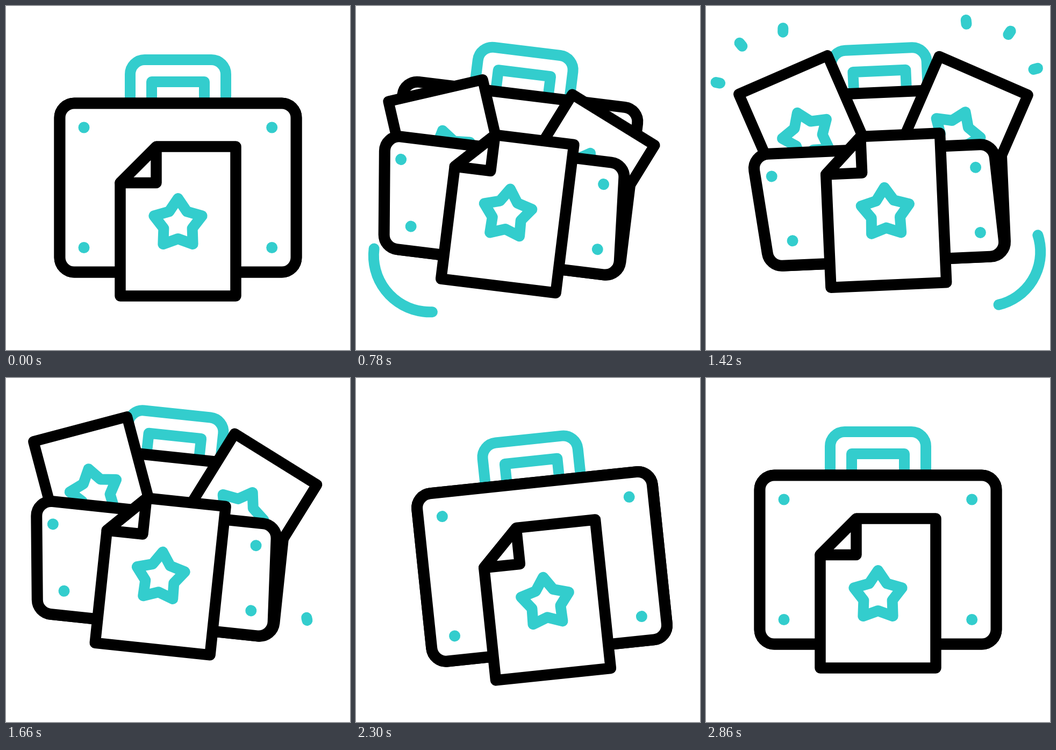
Recreate the animation shown at these times as an HTML page with a canvas. Size 640 px wide and 640 px high, loop 3560 ms.

```html
<!DOCTYPE html>
<html lang="en">
<head>
<meta charset="utf-8">
<title>Briefcase</title>
<style>
  html, body { margin: 0; width: 100%; height: 100%; overflow: hidden; background: #fff; }
  canvas { display: block; width: 640px; height: 640px; }
</style>
</head>
<body>
<canvas id="stage"></canvas>
<script>
const LOOP = 3560, STEP = 20, BLACK = '#000', CYAN = '#33cdcd', WHITE = '#fff';
const PIVOT = { x: 320, y: 87 };
const RAD = Math.PI / 180;

// Turning points of the two group motions: [time, degrees] and [time, pixels]
const SWING = [[220, 0], [790, 7], [1245, -6], [1750, 7], [2320, -6], [2860, 0]];
const BOB = [[220, 0], [650, -30], [1020, 23], [1570, -29], [1700, -34], [2110, 39], [2330, 13], [2860, 0]];

const canvas = document.getElementById('stage');
const ctx = canvas.getContext('2d');
const dpr = window.devicePixelRatio || 1;
canvas.width = canvas.height = 640 * dpr;

const mix = (a, b, p) => a + (b - a) * p;

// Smooth 0 to 1 between two times
function ramp(t, from, to) {
  const p = Math.min(1, Math.max(0, (t - from) / (to - from)));
  return (1 - Math.cos(Math.PI * p)) / 2;
}

// Eased travel through all turning points
function sway(keys, t) {
  let value = keys[0][1];
  for (let i = 1; i < keys.length; i++) {
    value += (keys[i][1] - keys[i - 1][1]) * ramp(t, keys[i - 1][0], keys[i][0]);
  }
  return value;
}

function line(points) {
  const path = new Path2D();
  points.forEach(([x, y]) => path.lineTo(x, y));
  return path;
}

function poly(points) {
  const path = line(points);
  path.closePath();
  return path;
}

function stroke(path, color, width, fill) {
  if (fill) { ctx.fillStyle = fill; ctx.fill(path); }
  ctx.strokeStyle = color;
  ctx.lineWidth = width;
  ctx.stroke(path);
}

// Case panel whose top corners drop and lean left as it opens
function panel(open) {
  const top = 181 + 105 * open;
  const corners = [[100 - 24 * open, top], [540 - 14 * open, top], [540, 495], [100, 495]];
  const path = new Path2D();
  path.moveTo(320, top);
  for (let i = 1; i <= 4; i++) {
    path.arcTo(...corners[i % 4], ...corners[(i + 1) % 4], 27);
  }
  path.closePath();
  return path;
}

const CASE = panel(0);
const HANDLE = new Path2D('M231 182 V127 A27 27 0 0 1 258 100 H382 A27 27 0 0 1 409 127 V182');
const GRIP = line([[271, 182], [271, 141], [369, 141], [369, 182]]);
const SHEET = poly([[280, 261.5], [427.5, 261.5], [427.5, 539.5], [212.5, 539.5], [212.5, 329]]);
const FOLD = poly([[212.5, 329], [279.5, 329], [279.5, 262]]);

function star(x, y) {
  const points = [];
  for (let i = 0; i < 10; i++) {
    const a = (i * 36 - 90) * RAD, r = i % 2 ? 28 : 47;
    points.push([x + r * Math.cos(a), y + r * Math.sin(a)]);
  }
  stroke(poly(points), CYAN, 20);
}

// left: the sheet's left edge, measured from its inner top corner at x, y
function paper(x, y, angle, left) {
  const right = left + 180;
  ctx.save();
  ctx.translate(x, y);
  ctx.rotate(angle * RAD);
  stroke(poly([[left, 0], [right, 0], [right, 215], [left, 215]]), BLACK, 20, WHITE);
  star(left + 86, 122.5);
  ctx.restore();
}

function papers(sunk) {
  ctx.save();
  ctx.beginPath();
  ctx.rect(-100, -100, 840, 590);
  ctx.clip();
  paper(225 + 54.5 * sunk, 108 + 153 * sunk, -21 + 3 * sunk, -180);
  paper(432.5 - 54.5 * sunk, 118.7 + 142 * sunk, 26 - 3.7 * sunk, 0);
  ctx.restore();
}

function dot(x, y) {
  ctx.fillStyle = CYAN;
  ctx.beginPath();
  ctx.arc(x, y, 10.5, 0, 2 * Math.PI);
  ctx.fill();
}

// Arc that sweeps 125 degrees; its tail follows its head
function whip(x, y, r, from, head, tail) {
  if (head - tail < 0.003) return;
  const at = p => (from - 125 * p) * RAD;
  const path = new Path2D();
  path.arc(x, y, r, at(tail), at(head), true);
  stroke(path, CYAN, 20);
}

// Two mirrored bursts of three rays
function sparks(t) {
  const head = mix(61, 125, ramp(t, 940, 1320));
  const tail = mix(61, 125, ramp(t, 940, 1560));
  if (head - tail < 0.3) return;
  for (const side of [-1, 1]) {
    for (let i = 0; i < 3; i++) {
      const a = (-13.5 - 40 * i) * RAD;
      const at = r => [315 + side * (178 + r * Math.cos(a)), 178 + r * Math.sin(a)];
      stroke(line([at(tail), at(head)]), CYAN, 20);
    }
  }
}

function draw(t) {
  ctx.setTransform(dpr, 0, 0, dpr, 0, 0);
  ctx.fillStyle = WHITE;
  ctx.fillRect(0, 0, 640, 640);
  ctx.lineCap = ctx.lineJoin = 'round';

  ctx.translate(PIVOT.x, PIVOT.y + sway(BOB, t));
  ctx.rotate(sway(SWING, t) * RAD);
  ctx.translate(-PIVOT.x, -PIVOT.y);

  const open = ramp(t, 220, 540) - ramp(t, 1980, 2280);
  const sunk = 1.3 * (1 - ramp(t, 520, 920) + ramp(t, 1610, 2030));

  stroke(HANDLE, CYAN, 20);
  stroke(GRIP, CYAN, 20);
  stroke(CASE, BLACK, 21, WHITE);
  if (open > 0) papers(sunk);

  stroke(panel(open), BLACK, 21, WHITE);
  dot(145 - 33.6 * open, 226 + 102 * open);
  dot(494.7 - 3.5 * open, 226 + 102 * open);
  dot(145, 449.5);
  dot(494.7, 449.5);

  stroke(SHEET, BLACK, 20.5, WHITE);
  stroke(FOLD, BLACK, 20.5);
  star(320, 405);

  whip(187, 499, 105, 180, ramp(t, 640, 840), ramp(t, 780, 1165));
  whip(504, 486, 101, 105, ramp(t, 1240, 1445), ramp(t, 1300, 1700));
  sparks(t);
}

const start = performance.now();
function frame() {
  const t = (performance.now() - start) % LOOP;
  draw(Math.floor(t / STEP) * STEP);
  requestAnimationFrame(frame);
}
frame();
</script>
</body>
</html>
```
